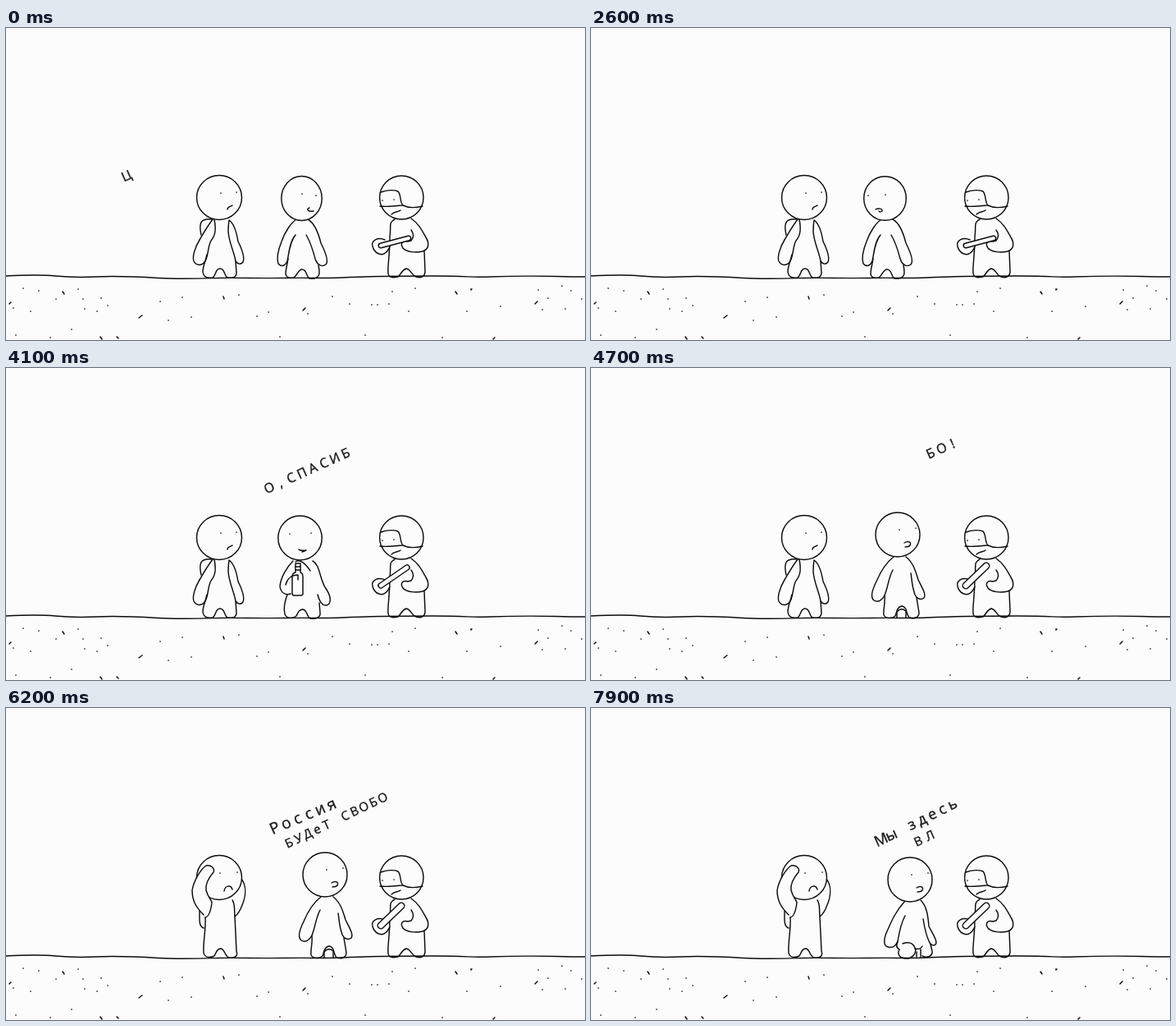
These frames come from a looping animation (706x380 px, 8000 ms). An HTML page with a canvas:

```html
<!DOCTYPE html>
<html lang="ru">
<head>
<meta charset="utf-8">
<style>
  html, body { margin: 0; width: 100%; height: 100%; overflow: hidden; background: #fcfcfc; }
  canvas { display: block; }
</style>
</head>
<body>
<canvas id="stage" width="706" height="380"></canvas>
<script>
const ctx = document.getElementById('stage').getContext('2d');
const PAPER = '#fcfcfc', INK = '#0c0c0c';
const LOOP = 8000, STEP = 100;

const ground = 'M0 302C20 301 40 300 60 302S90 304 110 303S160 303 185 304.5S240 305 260 304.5S310 305 340 304.5S390 305 410 304S470 302 520 302S560 304 590 303S650 302 670 302.5S695 303 706 303';
const dots = [21,317, 40,320, 88,318, 9,341, 30,345, 61,330, 94,330, 96,342, 116,329, 124,338,
  12,374, 54,377, 80,367, 111,345, 188,333, 198,356, 215,328, 226,352, 284,325, 306,351,
  320,346, 334,376, 368,348, 398,327, 419,336, 438,374, 446,337, 453,337, 471,321, 467,336,
  491,345, 499,317, 532,377, 562,345, 567,318, 603,339, 649,319, 654,343, 661,329, 678,314,
  682,342, 689,320, 702,330];
const ticks = 'M69 321l2 3M4 336l2-2M115 376l2 3M135 376l2 2M162 353l4-3M265 327l1 3M362 344l3-3M548 321l2 3M567 319l1-1M594 379l2-2M645 336l3-3';

const leftCalm = [
  'M238 252C236 243 236 236 241 234Q246 232 251 233',
  'M245 276C243 285 240 290 240 297C241 304 246 305 252 304C256 302 255 293 261 293S266 302 270 304C276 305 281 304 281 298L280 284',
  'M272 234C278 238 281 248 283 260C288 270 291 280 289 285C286 289 282 287 280 284C278 272 272 262 271 248Q271 240 272 234',
  'M253 232C246 240 241 250 236 258C230 268 227 279 229 284C232 290 239 290 243 284C247 276 246 266 250 259C256 252 256 244 254 233'
];
const leftShock = [
  'M287 208C293 216 293 228 288 240C285 248 282 252 279 254C278 248 280 240 276 234',
  'M236 247C236 258 235 266 241 268',
  'M243 255C244 270 240 285 241 298C242 305 250 304 254 302C257 296 258 293 262 293C267 294 267 303 272 304C280 305 283 302 281 296L279 254'
];
const shockArm = 'M241 252C232 243 227 235 227 222C229 210 237 197 244 192C250 191 255 195 253 200C246 208 243 215 244 222C246 230 250 233 251 237C250 245 248 254 243 255';
const standing = [
  'M354 233C348 237 340 248 336 260C332 270 330 281 332 287C336 292 341 289 343 284C345 274 346 260 353 252',
  'M368 233C377 238 381 250 384 262C389 272 394 284 390 288C385 292 379 288 377 281C374 270 372 262 366 252',
  'M344 281C343 288 341 294 341 299C341 304 346 305 351 304C355 302 356 294 361 294C367 294 366 303 370 305C376 306 382 304 382 298Q382 293 381 289'
];
const holding = [
  'M343 276C340 285 338 292 340 300C343 306 350 305 354 302C357 296 358 294 362 294C368 295 366 303 371 305C377 306 384 304 383 298L382 286',
  'M374 235C383 240 382 255 389 267C397 278 397 287 391 289C385 290 382 284 380 276',
  'M350 235C342 243 335 255 334 266C335 274 341 277 347 275',
  'M353 238H359V249Q362 250 362 254V275Q362 277 359 277H351Q349 277 349 274V254Q349 250 353 249Z',
  'M353 242H359M353 246H359',
  'M341 264C343 256 349 252 356 252L356 258',
  'M353 236C358 232 365 238 371 247'
];
const tall = [
  'M384 230C375 237 368 248 363 260C357 272 356 280 360 283C365 286 370 283 373 277C377 267 378 255 383 246',
  'M399 230C408 237 411 248 414 258C419 268 424 276 421 280C417 283 412 281 410 276C406 265 406 255 405 250',
  'M373 277C374 287 371 295 372 301C375 306 383 305 386 302C388 297 388 291 394 290C401 291 399 300 403 304C409 306 415 304 415 298L412 280',
  'M388 304V297Q393 291 399 296V304'
];
const crouched = [
  'M382 243C374 248 366 260 361 272C357 283 356 291 360 294C365 297 371 296 374 291C378 283 382 273 389 264',
  'M403 242C409 250 410 258 413 270C418 278 422 284 419 288C417 290 415 290 414 287M407 262L409 275',
  'M399 289C396 280 402 275 409 276C416 280 418 292 415 300C410 305 404 304 400 302',
  'M383 286C382 280 388 277 393 279C399 282 401 290 399 297C398 304 392 306 387 305C381 304 379 299 382 295L374 292'
];
const rising = [
  'M383 235C372 247 367 258 361 272C356 283 357 290 362 291C368 293 372 289 374 284C376 272 378 262 383 253',
  'M402 234C410 242 411 255 412 266C418 277 423 285 420 288C418 290 415 289 413 286C410 280 407 270 405 257',
  'M374 285C371 291 374 293 376 294C373 300 376 304 383 305C390 306 398 300 395 292C393 287 388 284 380 287',
  'M395 293Q401 295 404 290M397 297V303M402 294V303M404 302C410 305 417 302 416 296L414 288'
];
const guard = [
  'M474 233C466 237 470 241 468 254C468 280 465 290 466 299C467 305 473 304 478 303C482 300 482 295 488 293C494 294 494 301 500 303C506 305 511 303 511 296L510 272',
  'M494 232C503 238 507 246 512 255C517 263 515 270 508 272C500 274 488 273 484 268C480 262 484 258 490 260L494 259C498 254 497 250 494 246'
];
const guardFace = 'M457 200C464 197 474 197 478 199C482 203 480 212 484 216C490 219 500 219 508 217M456 217C464 218 474 217 483 216M470 227C474 223 477 225 481 222';
const hand = 'M462 258C453 254 445 259 447 266C449 274 456 277 461 275Q466 272 468 266';
const chantMouth = 'M8 10C13 7 17 9 15 13C13 16 10 14 9 15';
const crouchMouth = 'M10 15C9 9 14 9 17 11';

// x, y: centre of the first letter; dx, dy: advance; on/off: start of writing and wiping; ms per letter
const lines = [
  { text: 'ЦЕЛУЮ,  ДАЕТе?', size: 16, x: 147, y: 180, dx: 13.7, dy: -6.6, on: -80, onStep: 85, off: 900, offStep: 85 },
  { text: 'О,СПАСИБО!', size: 16, x: 321, y: 146, dx: 13.3, dy: -6, on: 3400, onStep: 95, off: 4400, offStep: 45 },
  { text: 'Россия', size: 19, x: 328, y: 147, dx: 13.8, dy: -5.8, on: 4850, onStep: 90, off: 6700, offStep: 22 },
  { text: 'БУДеТ СВОБОДНОЙ!', size: 15, x: 345, y: 164, dx: 11.4, dy: -5.5, on: 5430, onStep: 80, off: 6830, offStep: 22 },
  { text: 'Мы здесь', size: 18, x: 354, y: 161, dx: 12.4, dy: -6.2, on: 7150, onStep: 75, off: LOOP, offStep: 0 },
  { text: 'ВЛАСТЬ', size: 15, x: 399, y: 162, dx: 14, dy: -7, on: 7750, onStep: 80, off: LOOP, offStep: 0 }
];

function stroke(d, filled) {
  const path = new Path2D(d);
  if (filled) ctx.fill(path);
  ctx.stroke(path);
}

function strokeAll(paths) {
  paths.forEach(d => stroke(d));
}

function dot(x, y, r = 0.85) {
  ctx.fillStyle = INK;
  ctx.beginPath();
  ctx.arc(x, y, r, 0, 7);
  ctx.fill();
  ctx.fillStyle = PAPER;
}

function head(x, y, rx, ry) {
  ctx.beginPath();
  ctx.ellipse(x, y, rx, ry, 0, 0, 7);
  ctx.fill();
  ctx.stroke();
}

function face(x1, y1, x2, y2, mouth) {
  dot(x1, y1);
  dot(x2, y2);
  stroke(mouth);
}

function drawLeft(t) {
  const shocked = t >= 5700;
  strokeAll(shocked ? leftShock : leftCalm);
  head(260, 206.5, 27.5, 27);
  if (shocked) {
    face(261, 201, 282, 200, 'M266 223C267 216 274 215 276 221');
    stroke(shockArm, true);
  } else {
    face(262, 201, 281, 200, 'M270 221C270 217 274 218 276 216');
  }
}

function drawMiddle(t) {
  if (t >= 4600) {
    drawChant(t);
  } else if (t >= 3000) {
    head(358.5, 207, 26.7, 27);
    strokeAll(holding);
    face(346, 202, 372, 201, 'M357 221Q359 223 366 222L361 224');
  } else {
    strokeAll(standing);
    if (t < 300) {
      head(360.5, 207.5, 24.7, 27);
      face(361, 202, 378, 204, 'M375 223C369 224 365 221 370 219');
    } else {
      head(358.5, 207.5, 25.8, 26.8);
      face(338, 204, 359, 203, 'M347 221C350 219 356 220 355 223Q352 225 351 223');
    }
  }
}

// walk aside, then bounce while chanting
function drawChant(t) {
  const walk = Math.min(1, (t - 4500) / 400);
  const phase = t < 4900 ? 300 : (t - 4800) % 600;
  const [pose, y, mouth] = phase === 0 ? [crouched, 216, crouchMouth]
    : phase === 100 || phase === 500 ? [rising, 209, chantMouth]
    : [tall, 203, chantMouth];
  ctx.save();
  ctx.translate(30 * (walk - 1), 0);
  strokeAll(pose);
  ctx.translate(389, y);
  head(0, 0, 27, 27);
  face(2, -6, 22, -8, mouth);
  ctx.restore();
}

function drawGuard(t) {
  strokeAll(guard);
  head(482.3, 206.5, 26.7, 26.5);
  stroke(guardFace);
  dot(459, 210);
  dot(473, 209);
  stroke(hand, true);

  const swing = t % (2600 / 3);
  const up = swing > 80 && swing < 570;
  const middle = swing >= 570 && swing < 700;
  const [x, y, w] = up ? [482, 241, 9] : middle ? [489, 243, 7.5] : [491, 256, 7];
  const baton = new Path2D(`M457 265L${x} ${y}`);
  ctx.save();
  ctx.lineWidth = w;
  ctx.stroke(baton);
  ctx.lineWidth = w - 2.9;
  ctx.strokeStyle = PAPER;
  ctx.stroke(baton);
  ctx.restore();
}

function drawText(t) {
  ctx.fillStyle = ctx.strokeStyle = '#1c1c1c';
  ctx.lineWidth = 0.4;
  ctx.textAlign = 'center';
  for (const line of lines) {
    ctx.font = `${line.size}px "Open Sans", "Noto Sans", sans-serif`;
    let k = 0;
    [...line.text].forEach((letter, i) => {
      if (letter === ' ') return;
      const visible = t >= line.on + k * line.onStep && t < line.off + k * line.offStep;
      k++;
      if (!visible) return;
      ctx.save();
      ctx.translate(line.x + i * line.dx, line.y + i * line.dy);
      ctx.rotate(-0.42);
      ctx.fillText(letter, 0, 5.5);
      ctx.strokeText(letter, 0, 5.5);
      ctx.restore();
    });
  }
}

function draw(now) {
  const t = Math.floor(now % LOOP / STEP) * STEP;
  ctx.fillStyle = PAPER;
  ctx.fillRect(0, 0, 706, 380);
  ctx.strokeStyle = INK;
  ctx.lineWidth = 1.45;
  ctx.lineCap = ctx.lineJoin = 'round';
  stroke(ground);
  stroke(ticks);
  for (let i = 0; i < dots.length; i += 2) dot(dots[i], dots[i + 1]);
  drawLeft(t);
  drawMiddle(t);
  drawGuard(t);
  drawText(t);
}

const start = performance.now();
function tick() {
  draw(performance.now() - start);
  requestAnimationFrame(tick);
}
tick();
</script>
</body>
</html>
```
